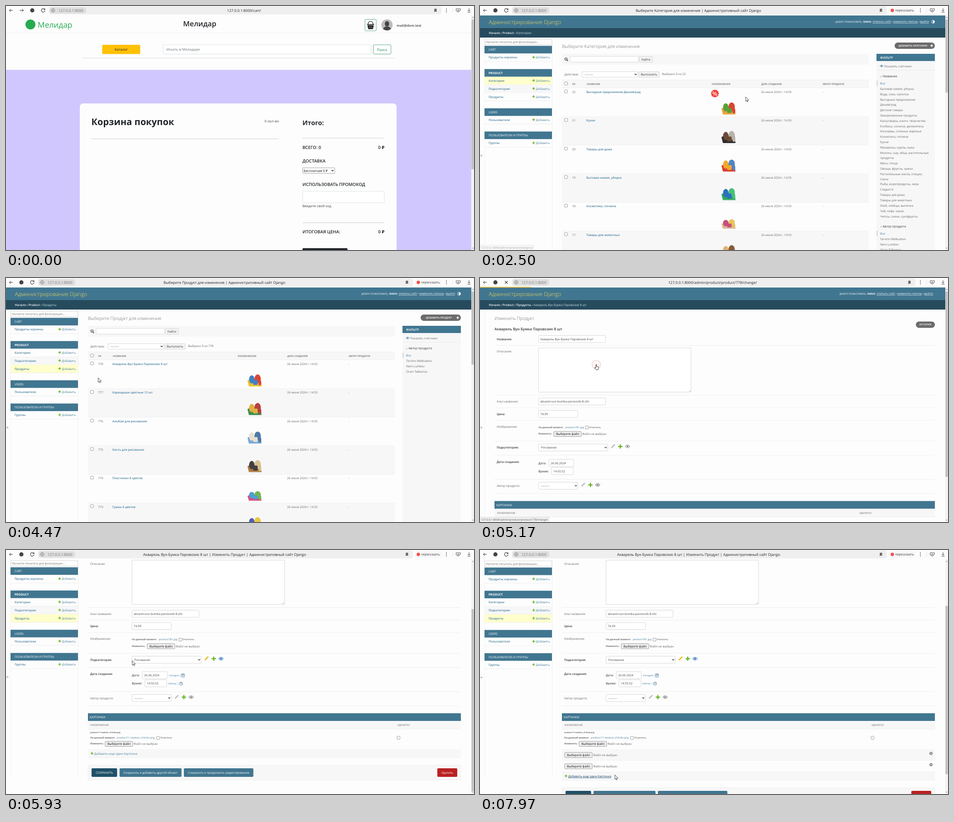
Write an HTML page that moves like this. It is 1034 px wide and 541 px high and loops after 8000 ms.

```html
<!DOCTYPE html>
<html lang="ru">
<head>
<meta charset="utf-8">
<title>Админка</title>
<style>
html, body { margin: 0; width: 100%; height: 100%; overflow: hidden; background: #fdfdfd; }
svg { display: block; width: 100vw; height: 100vh; }
text { font-family: "Open Sans", "Noto Sans", sans-serif; text-rendering: geometricPrecision; white-space: pre; }
.hover { text-decoration: underline; fill: #0b3c5d; }
</style>
</head>
<body>
<svg id="stage" viewBox="0 0 1034 541" xmlns="http://www.w3.org/2000/svg"></svg>
<script>
const LOOP = 8000;
const ITEM = 'Акварель Вун Бумка Паровозик 8 шт';
const TEAL = '#417690', NAVY = '#264b5d', LINK = '#447e9b', PALE = '#f7f7f8', EDGE = '#ebebeb', INK = '#212529';

// Normalise each weight so nominal sizes give the expected line lengths.
const pen = document.createElement('canvas').getContext('2d');
function measure(s, z, w) {
  pen.font = `${w} 100px "Open Sans", "Noto Sans", sans-serif`;
  return pen.measureText(s).width * z / 100;
}
const ratio = {};
for (const [w, s, z, len] of [
  [300, 'Администрирование Django', 12.92, 160],
  [400, 'Канцтовары, книги, творчество', 7, 101],
  [600, 'Бытовая химия, уборка', 7, 78],
  [700, 'Корзина покупок', 21.5, 183]
]) ratio[w] = len / measure(s, z, w);

// ---- drawing helpers ----
function t(x, y, s, { z = 7, w = 400, c = '#666', a = 'start', k = '' } = {}) {
  const size = z * ratio[w];
  return `<text x="${x}" y="${y + z * .33}" font-size="${size.toFixed(3)}" font-weight="${w}" fill="${c}" text-anchor="${a}" class="${k}">${s}</text>`;
}
const r = (x, y, w, h, f, s = 'none', rx = 0) =>
  `<rect x="${x}" y="${y}" width="${w}" height="${h}" rx="${rx}" fill="${f}" stroke="${s}" stroke-width=".7"/>`;
const p = (d, s, w = 1, f = 'none') =>
  `<path d="${d}" stroke="${s}" stroke-width="${w}" fill="${f}" stroke-linecap="round" stroke-linejoin="round"/>`;
const hl = (x, y, x2, c = EDGE) => r(x, y, x2 - x, .8, c);
const dot = (x, y, q, f, s = 'none', w = 1) =>
  `<circle cx="${x}" cy="${y}" r="${q}" fill="${f}" stroke="${s}" stroke-width="${w}"/>`;
const g = (s, x = 0, y = 0, k = '') => `<g class="${k}" transform="translate(${x} ${y})">${s}</g>`;
const plus = (x, y, q = 2.5, c = '#64b324') => p(`M${x - q} ${y}h${2 * q}M${x} ${y - q}v${2 * q}`, c, q * .62);
const pencil = (x, y, q = 2.4, c = '#efb80b') =>
  p(`M${x - q * .6} ${y + q * .6}L${x + q} ${y - q}`, c, q * .75) + p(`M${x - q} ${y + q}l.6-.6`, c, 1);
const eye = (x, y, c, q = 1) =>
  p(`M${x - 5 * q} ${y}q${5 * q} ${-6.5 * q} ${10 * q} 0q${-5 * q} ${6.5 * q} ${-10 * q} 0z`, c, 1.1 * q) + dot(x, y, 2 * q, c);
const box = (x, y) => r(x, y, 6.5, 6.5, '#fff', '#767676', 1);
const input = (x, y, w, h, s = '', tx = 4) => r(x, y, w, h, '#fff', '#c8c8c8', 1.5) + t(x + tx, y + h / 2 + .3, s, { c: '#444' });
const select = (x, y, w, h, s) => input(x, y, w, h, s, 5.5) +
  p(`M${x + w - 6.5} ${y + h / 2 - 1}l2 2l2-2`, '#222', 1.1);
const fileBtn = (x, y) => r(x, y, 61, 11.3, '#efefef', '#767676', 1.5) +
  t(x + 30.5, y + 5.8, 'Выберите файл', { z: 7.2, c: '#111', a: 'middle' }) + t(x + 63, y + 5.8, 'Файл не выбран', { z: 7.1 });
const button = (x, y, w, h, s, f) => r(x, y, w, h, f, 'none', 2) + t(x + w / 2, y + h / 2, s, { c: '#fff', a: 'middle' });
const pill = (x, y, w, s, tx) => r(x, y, w, 14, '#6b6b6b', 'none', 7) + t(tx, y + 7, s, { z: 5.9, w: 600, c: '#fff', a: 'middle' });

// ---- browser bar ----
function bar(title, cx, shift, ask) {
  const end = ask ? 899 : 962, m = end - 13;
  let s = r(0, 0, 1034, 21, '#fcfcfc') + r(95 - shift, 1, end - 95 + shift, 17.5, '#efefef', 'none', 5)
    + r(96 - shift, 3, 81, 13.5, '#dedede', 'none', 5)
    + p('M14.5 9.7H7.5m3-3l-3 3l3 3', '#333')
    + (shift ? '' : p('M30.5 9.7h8m-3-3l3 3l-3 3', '#333'))
    + dot(58 - shift, 9.7, 4.6, '#444');
  const gx = 104 - shift;
  s += dot(gx, 9.7, 4, 'none', '#888', .8) + p(`M${gx - 4} 9.7h8M${gx} 5.7q-3.4 4 0 8q3.4-4 0-8`, '#888', .7)
    + t(116 - shift, 9.9, '127.0.0.1:8000', { z: 8.6, c: '#777' })
    + t(cx, 9.9, title, { z: 8.6, c: '#222', a: 'middle' })
    + p(`M${m - 2} 6.5h4v6.5l-2-1.6l-2 1.6z`, '#666', .8, '#666')
    + [6.2, 9.7, 13.2].map(y => dot(973, y, .9, '#444')).join('')
    + r(986.5, 4, .7, 11, '#ddd')
    + p('M995 6h4v5h-4zM1000 6h4v4h-3v3h-4', '#444', .9)
    + p('M1023 5.5v6m-2.5-2.3l2.5 2.5l2.5-2.5M1020 14h6', '#333', .9);
  if (ask) s += r(904, 3, 58, 13.5, '#f6f6f6', 'none', 5) + dot(911, 9.7, 3.7, '#f0504e') + t(917.5, 9.9, 'пересказать', { z: 7.3, c: '#333' });
  return s;
}

// ---- shop cart ----
function cart() {
  const head = (x, y, s, a) => t(x, y, s, { z: 10.3, w: 600, c: INK, a });
  return r(0, 21, 1028, 520, '#fdfdfd') + hl(0, 59, 1028)
    + dot(54, 41, 11, '#27ab50') + t(70, 42, 'Мелидар', { z: 18.5, c: '#27ab50' })
    + t(428, 39, 'Мелидар', { z: 17, w: 600, c: INK, a: 'middle' })
    + r(793, 29.5, 25, 25.5, '#fff', '#198754', 2)
    + p('M800 41q0-7 5.500-7q5.500 0 5.500 7', '#111', 1.2)
    + p('M798 41h15M799.500 43.500h12l-1.500 7h-9z', '#111', 1.4, '#111')
    + p('M802.500 45v4m3-4v4m3-4v4', '#fff', .7)
    + dot(841.8, 42, 12.4, '#bcbcbc') + `<ellipse cx="841.8" cy="39.500" rx="4.800" ry="6" fill="#444"/>`
    + p('M833.500 51q1-5 8.300-5.500q7.300.5 8.300 5.500q-8.300 6-16.600 0z', '#444', .5, '#444')
    + t(863, 43.5, 'mail@dom.test', { z: 8, w: 600, c: '#444' })
    + r(212.5, 86, 84, 20.5, '#ffc107', 'none', 2) + t(254.5, 96.7, 'Каталог', { z: 8.2, c: INK, a: 'middle' })
    + r(347.5, 86, 459, 20.5, '#fff', '#ced4da', 2) + t(354, 96.7, 'Искать в Мелидаре', { z: 8.4, c: '#6c757d' })
    + r(811.5, 86, 39, 20.5, '#fff', '#198754', 2) + t(831, 96.7, 'Поиск', { z: 8.5, c: '#198754', a: 'middle' })
    + hl(168, 115, 856, '#d2d2d2') + r(0, 141.5, 1028, 400, '#d0c7fe')
    + r(163, 216, 700, 340, '#fdfdfd', 'none', 8)
    + t(188.5, 256.5, 'Корзина покупок', { z: 21.5, w: 700, c: INK })
    + t(603, 255.5, '0 кол-во', { z: 8.2, w: 600, c: '#6c757d', a: 'end' })
    + hl(189, 294, 603, '#c4c4c4') + t(655, 259, 'Итого:', { z: 15, w: 700, c: INK }) + hl(655, 292.5, 836, '#c4c4c4')
    + head(655, 313.5, 'ВСЕГО: 0') + head(836, 313.5, '0 ₽', 'end') + head(655, 343.5, 'ДОСТАВКА')
    + r(655.3, 358.8, 71, 12.3, '#fff', '#767676', 1) + t(657.5, 365.3, 'Бесплатная 0 ₽', { z: 7.8, c: '#111' })
    + p('M719.500 364l1.900 2l1.900-2', '#111', 1.1)
    + head(655, 396, 'ИСПОЛЬЗОВАТЬ ПРОМОКОД') + r(655.3, 411, 180.5, 25.3, '#fff', '#ced4da', 2)
    + t(655, 443.5, 'Введите свой код', { z: 8, c: '#444' }) + hl(655, 480, 836, '#c4c4c4')
    + head(655, 500.5, 'ИТОГОВАЯ ЦЕНА:') + head(836, 500.5, '0 ₽', 'end') + r(655, 537, 99.5, 10, INK, 'none', 2);
}

// ---- admin parts ----
function header(w, end, icon) {
  const u = s => `<tspan text-decoration="underline">${s}</tspan>`;
  return r(0, 21, w, 28, TEAL) + t(19.5, 35.7, 'Администрирование Django', { z: 12.92, w: 300, c: '#f5dd5d' })
    + t(end, 35, `ДОБРО ПОЖАЛОВАТЬ, <tspan font-weight="700">TARVO</tspan>. ${u('ОТКРЫТЬ САЙТ')} / ${u('ИЗМЕНИТЬ ПАРОЛЬ')} / ${u('ВЫЙТИ')}`, { z: 5.9, c: '#fff', a: 'end' })
    + (icon ? dot(end + 9, 35, 3.3, 'none', '#fff', .9) + p(`M${end + 9} 31.700a3.300 3.300 0 0 1 0 6.600z`, '#fff', .3, '#fff') : '');
}
const crumbs = (links, last) => r(0, 49, 1028, 21, NAVY)
  + t(19.5, 59.8, `<tspan font-weight="600">${links.join(' › ')}</tspan> › <tspan fill="#d3e4ec">${last}</tspan>`, { c: '#fff' });

const APPS = [
  ['CART', 85, ['Продукты корзины']],
  ['PRODUCT', 136.5, ['Категории', 'Подкатегории', 'Продукты']],
  ['USERS', 223.5, ['Пользователи']],
  ['ПОЛЬЗОВАТЕЛИ И ГРУППЫ', 275, ['Группы']]
];
function modules(x, w, pad, current) {
  const side = pad > 5, end = x + w;
  return APPS.map(([name, y, rows]) => r(x, y, w, 17, TEAL)
    + t(x + pad, y + 8.7, name, { c: '#fff', w: side && name === 'PRODUCT' ? 700 : 400 })
    + rows.map((row, i) => {
      const top = y + 17 + i * 17.8, mid = top + 8.8, add = side ? end - 35.5 : end - 93;
      return r(x, top, w, 17.8, row === current ? '#ffffcc' : i % 2 ? PALE : '#fdfdfd') + hl(x, top + 17.4, end)
        + t(x + pad, mid, row, { w: 600, c: LINK, k: `${side ? 'side' : 'main'}-${row}` })
        + plus(add - 5, mid - .5) + t(add, mid, 'Добавить', { c: LINK })
        + (side ? '' : pencil(end - 46, mid) + t(end - 41, mid, 'Изменить', { c: LINK }));
    }).join('')).join('');
}
const side = current => r(0, 70, 160, 480, '#fdfdfd') + r(159.2, 70, .8, 480, EDGE) + r(9.6, 70, .6, 480, EDGE)
  + r(10.3, 73.5, 148.5, 12, '#fdfdfd', '#ccc') + t(13, 79.7, 'Начните печатать для фильтрации...', { c: '#757575' })
  + g(modules(10, 149, 9, current), 0, 3.3) + t(1, 331, '«', { z: 10, c: LINK });

function index() {
  return r(0, 21, 1034, 520, '#fdfdfd') + header(1034, 1001, true)
    + t(19.5, 68, 'Администрирование сайта', { z: 10.77, w: 300 }) + modules(19.5, 324.5, 4.5)
    + r(365, 85, 141, 101, PALE) + t(374, 100.5, 'Последние действия', { z: 9, c: '#333' }) + hl(365, 115, 506)
    + t(374, 130, 'Мои действия', { z: 7.4, w: 600 }) + pencil(377.5, 148)
    + t(384, 148.5, ITEM.slice(0, -3), { c: LINK }) + t(384, 157.5, 'шт', { c: LINK }) + t(384, 166.2, 'Продукт', { z: 5.4 });
}

// ---- change lists ----
const GOODS = [
  ['Выгодные предложения Дешевград', ['#e8a33c', '#58a03a', '#d8452e']],
  ['Кухня', ['#2e2b2b', '#6b4a36', '#b9b2aa']],
  ['Товары для дома', ['#d9402f', '#f0a92d', '#4f86c6']],
  ['Бытовая химия, уборка', ['#2fa65a', '#2c6fc0', '#48c078']],
  ['Косметика, гигиена', ['#d8b898', '#c94f7c', '#e8c35a']],
  ['Товары для животных', ['#c98a4b', '#e0b070', '#8a5a34']]
];
const PAINTS = [
  [ITEM, ['#f0c030', '#4080c8', '#d84838']],
  ['Карандаши цветные 12 шт', ['#3f8f4f', '#e0b040', '#b84040']],
  ['Альбом для рисования', ['#7aa8d8', '#e8e0d0', '#5078a8']],
  ['Кисть для рисования', ['#b07840', '#404040', '#d8c090']],
  ['Пластилин 8 цветов', ['#d85080', '#50a0d0', '#70b850']],
  ['Гуашь 6 цветов', ['#e07030', '#5060b0', '#e8c840']]
];
const photo = (y, [a, b, c], h) => p(`M537 ${y}l-3-${h * .45}l8-${h * .15}l20 0l2 ${h * .6}z`, a, 1, a)
  + `<ellipse cx="543" cy="${y - h * .55}" rx="6" ry="${h * .34}" fill="${b}"/>`
  + `<ellipse cx="556" cy="${y - h * .6}" rx="7" ry="${h * .36}" fill="${c}"/>`
  + r(546, y - h * .5, 10, h * .4, b, 'none', 2) + r(558, y - h * .45, 6, h * .38, c, 'none', 2);
function badge() {
  const pts = Array.from({ length: 24 }, (_, i) => {
    const q = i % 2 ? 7.6 : 9, a = i * Math.PI / 12;
    return `${(519 + q * Math.cos(a)).toFixed(1)},${(194 + q * Math.sin(a)).toFixed(1)}`;
  });
  return `<polygon points="${pts.join(' ')}" fill="#f0392f"/>` + t(519, 194.300, '%', { z: 14, w: 600, c: '#fff', a: 'middle' });
}
const KINDS = ['Все', 'Бытовая химия, уборка', 'Вода, соки, напитки', 'Выгодные предложения', '+Дешевград', 'Детские товары',
  'Замороженные продукты', 'Канцтовары, книги, творчество', 'Колбасы, сосиски, деликатесы', 'Консервы, соленья, варенье',
  'Косметика, гигиена', 'Кухня', 'Макароны, крупы, мука', 'Молоко, сыр, яйца, растительные', '+продукты', 'Мясо, птица',
  'Овощи, фрукты, орехи', 'Растительные масла, специи,', '+соусы', 'Рыба, морепродукты, икра', 'Сладости', 'Товары для дома',
  'Товары для животных', 'Хлеб, хлебцы, выпечка', 'Чай, кофе, какао', 'Чипсы, снеки, сухофрукты'];
const PEOPLE = ['Все', 'Tarvino Melkudovs', 'Nero Lumkov', 'Orvin Talkemov'];
function choices(y, name, list) {
  let at = y + 4.6;
  return t(884, y, '↓ ' + name, { z: 7.3, c: '#333' }) + r(876.5, y + 10, 1.8, 12, '#ccc') + list.map((s, i) => {
    at += s[0] === '+' ? 10.9 : 11.9;
    return t(884, at, s.replace('+', ''), { c: i ? '#666' : LINK });
  }).join('');
}
function list(one, add, crumb, rows, first, count, filters) {
  const head = (x, s) => t(x, 172.7, s, { z: 5.8, w: 600 });
  const grey = (x, y, w, s) => r(x, y, w, 12.5, '#f3f3f3', '#c4c4c4', 1.5) + t(x + w / 2, y + 6.5, s, { c: '#333', a: 'middle' });
  return r(0, 21, 1028, 520, '#fdfdfd') + header(1028, 992, true) + crumbs(['Начало', 'Product'], crumb) + side(crumb)
    + t(181, 89, `Выберите ${one} для изменения`, { z: 10.77, w: 300 })
    + pill(916, 81, 89, add, 956.5) + plus(998, 88, 2.6, '#fff')
    + r(181, 106, 678, 24, PALE) + dot(190, 117.5, 2.5, 'none', '#333', 1.2) + p('M192 119.500l2 2.300', '#333', 1.4)
    + r(199, 111.8, 151, 12.5, '#fff', '#ccc', 1.5) + grey(352, 112, 29, 'Найти')
    + t(186.5, 152, 'Действие:') + select(225.5, 145.5, 123, 12.5, '---------') + grey(351, 145.5, 45, 'Выполнить')
    + t(402, 151, `Выбрано 0 из ${count}`)
    + r(181, 164, 678, 17.5, PALE) + hl(181, 163.6, 859) + hl(181, 181.2, 859) + box(187, 168.700)
    + head(204, 'PK') + head(236, 'НАЗВАНИЕ') + head(512, 'ИЗОБРАЖЕНИЕ') + head(621.5, 'ДАТА СОЗДАНИЯ') + head(757, 'АВТОР ПРОДУКТА')
    + rows.map(([name, tones], i) => {
      const y = 190.7 + i * 63.3;
      return (i % 2 ? r(181, y - 8.7, 678, 63.3, PALE) : '') + hl(181, y + 54.2, 859) + box(186.8, y - 4.5)
        + t(203.5, y, first - i) + t(235, y, name, { w: 600, c: LINK, k: name === ITEM ? 'item' : '' })
        + photo(y + 49, tones, i === 4 ? 21 : 27) + t(621, y, '26 июня 2024 г. 14:55') + t(756.5, y, '-');
    }).join('')
    + r(876, 122, 129, 430, PALE) + r(876, 106, 129, 16, TEAL) + t(884, 114.2, 'ФИЛЬТР', { z: 7.3, w: 600, c: '#fff' })
    + eye(887.3, 133, LINK, .7) + t(892.5, 133.7, 'Показать счётчики') + hl(876, 142, 1005) + filters;
}

// ---- change form ----
function form(open, n) {
  const dx = open ? 149 : 0, R = 1005 - dx, live = open ? '#efb80b' : '#bbb', del = open ? 716 : 838;
  const label = (y, s, bold) => t(37, y, s, bold ? { w: 600, c: '#333' } : {});
  const tiny = (x, y, s, o) => t(x, y, s, { z: 5.9, ...o });
  const now = { w: 600, c: '#555' };
  let s = t(32, 89, 'Изменить Продукт', { z: 10.77, w: 300 }) + pill(R - 42, 96.5, 42, 'ИСТОРИЯ', R - 21)
    + t(32, 112.7, ITEM, { z: 8.6, w: 600, c: '#333' })
    + [149.3, 259.5, 287.5, 315.2, 361.3, 392.5, 446, 477.3].map(y => hl(32, y, R)).join('')
    + label(135.5, 'Название:', true) + input(129.3, 127.5, 148, 15.6, ITEM)
    + label(163, 'Описание:') + input(129.3, 155, 337, 98) + p('M462 252l3-3M464 252l1-1', '#888', .6)
    + label(274, 'Альт.название:') + input(129.3, 266, 148, 15.6, 'akvarel-vun-bumka-parovozik-8-sht')
    + label(301.5, 'Цена:', true) + input(129.3, 293.5, 87, 15.6, '74,99')
    + label(329.3, 'Изображение:') + tiny(129, 331, 'На данный момент:', now) + tiny(188.5, 331, 'product/781.jpg', { c: LINK })
    + box(233, 328) + tiny(241, 331, 'Очистить', { c: '#444' }) + tiny(129, 345.2, 'Изменить:', now) + fileBtn(163, 340.2)
    + label(376, 'Подкатегория:', true) + select(129.3, 368, 153, 15.6, 'Рисование')
    + pencil(293.5, 373.5, 3.6, live) + plus(310, 373.5, 3.8) + eye(326, 373.5, open ? '#2b70b8' : '#888')
    + label(407.3, 'Дата создания:', true) + t(129, 410.5, 'Дата:', now) + input(152.3, 402.3, 55, 15.6, '26.06.2024')
    + t(129, 428.5, 'Время:', now) + input(158, 420.2, 48, 15.6, '14:55:52')
    + label(460.7, 'Автор продукта:') + select(129.3, 452.8, 87, 15.6, '---------')
    + pencil(227.5, 458.7, 3.6, '#bbb') + plus(244, 458.7, 3.8) + eye(260, 458.7, '#888')
    + r(32, 494.5, R - 32, 17, TEAL) + t(36, 503.3, 'КАРТИНКИ', { c: '#fff' })
    + r(32, 512, R - 32, 17.5, PALE) + hl(32, 529.3, R)
    + tiny(37.5, 521, 'ИЗОБРАЖЕНИЕ') + tiny(del, 521, 'УДАЛИТЬ?')
    + tiny(37, 536.7, 'product/11-sladosti_xTsFz6z.png', { z: 4.6, w: 600, c: '#444' })
    + tiny(37, 549, 'На данный момент:', now) + tiny(96, 549, 'product/11-sladosti_xTsFz6z.png', { c: LINK })
    + box(183.500, 546) + tiny(192, 549, 'Очистить', { c: '#444' }) + box(del - 1, 545.5)
    + tiny(37, 561.7, 'Изменить:', now) + fileBtn(70, 556.7) + hl(32, 574.3, R);
  if (open) s += tiny(211, 410.5, 'Сегодня |', { c: LINK }) + tiny(209, 428.7, 'Сейчас |', { c: LINK })
    + r(238.5, 407.5, 7, 7, '#fff', TEAL, 1) + p('M238.500 409.500h7M240.500 412h3M240.500 406.500v1.500M243.500 406.500v1.500', TEAL, .9)
    + dot(237.7, 428.7, 3.3, '#fff', TEAL, 1) + p('M237.700 426.700v2h1.500', TEAL, .8);
  for (let i = 0; i < n; i++) {
    const y = 574.5 + i * 25;
    s += r(32, y, R - 32, 25, i % 2 ? '#fdfdfd' : PALE) + hl(32, y + 24.6, R) + fileBtn(38, y + 6.9)
      + dot(R - 8.5, y + 9, 3.6, '#888') + p(`M${R - 9.8} ${y + 7.7}l2.600 2.600m0-2.600l-2.600 2.600`, '#fff', .9);
  }
  s += g(r(32, 574.5, R - 32, 18, PALE) + hl(32, 592.3, R) + plus(41, 583.5) + t(46, 584, 'Добавить еще один Картинка', { c: LINK, k: 'add' })
    + r(32, 609.5, R - 32, 33, PALE, EDGE, 1.5)
    + button(40, 616.5, 56.5, 19, 'СОХРАНИТЬ', '#205067') + button(101.8, 616.5, 137, 19, 'Сохранить и добавить другой объект', TEAL)
    + button(244, 616.5, 153.5, 19, 'Сохранить и продолжить редактирование', TEAL) + button(R - 52, 616.5, 44, 19, 'Удалить', '#ba2121'), 0, n * 25);
  const top = header(1028, open ? 992 : 1001, open) + crumbs(['Начало', 'Product', 'Продукты'], ITEM);
  return r(0, 21, 1028, 520, '#fdfdfd') + g(g(s, dx) + top, 0, 0, 'page')
    + (open ? g(side('Продукты'), 0, 0, 'side') : r(9.6, 70, .6, 480, EDGE) + t(1, 331, '»', { z: 10, c: LINK }));
}

// ---- scenes ----
const SITE = ' | Административный сайт Django';
const OPEN = bar(ITEM + ' | Изменить Продукт' + SITE, 483, 24, true);
const scenes = [
  [0, bar('127.0.0.1:8000/cart/', 526, 0), cart(), 30, 332],
  [1020, bar('Администрирование сайта' + SITE, 526.5, 0), index(), 0, 0],
  [2080, bar('Выберите Категория для изменения' + SITE, 482.5, 24, true),
    list('Категория', 'ДОБАВИТЬ КАТЕГОРИЯ', 'Категории', GOODS, 22, 22,
      choices(155.5, 'Название', KINDS) + choices(488.3, 'Автор продукта', PEOPLE)) + badge(), 30, 162],
  [3950, bar('Выберите Продукт для изменения' + SITE, 482.5, 24, true),
    list('Продукт', 'ДОБАВИТЬ ПРОДУКТ', 'Продукты', PAINTS, 778, 778, choices(155.5, 'Автор продукта', PEOPLE)), 30, 162],
  [5150, bar('127.0.0.1:8000/admin/product/product/778/change/', 514, 24), form(false, 0), 30, 411],
  [5330, OPEN, form(true, 0), 131, 404],
  [6800, OPEN, form(true, 1), 127, 388],
  [7420, OPEN, form(true, 2), 124, 373]
];
const stage = document.getElementById('stage');
stage.innerHTML = '<clipPath id="view"><rect y="21" width="1034" height="520"/></clipPath>'
  + scenes.map(s => `<g class="scene">${s[1]}<g clip-path="url(#view)">${s[2]}</g></g>`).join('')
  + `<g id="scroll">${r(1028, 21, 6, 520, '#f3f3f3')}${p('M1029.500 26.500l1.500-2l1.500 2M1029.500 536l1.500 2l1.500-2', '#777', .8)}<rect id="thumb" x="1028.400" width="5.200" fill="#c1c1c1"/></g>`
  + `<g id="reload">${p('M3.500-2.200A4 4 0 1 0 4 1M4-4v2.600h-2.600', '#333', 1.1)}</g><g id="stop">${p('M-2.700-2.700l5.400 5.400m0-5.400l-5.400 5.400', '#333', 1.1)}</g>`
  + '<rect id="load" y="19.600" height="1.700" fill="#f3c23c"/>'
  + `<g id="status"><rect x="-2" y="530.500" height="12" fill="#f1f1f1" stroke="#d0d0d0" stroke-width=".7"/>${t(2, 536, '', { z: 6.5, c: '#555' })}</g>`
  + '<circle id="ring" fill="#f8d0d0" fill-opacity=".25" stroke="#e87878" stroke-width="1.300"/>'
  + `<g id="arrow">${p('M0 0v9.300l2.200-2l1.500 3.300l1.400-.6l-1.500-3.200h3z', '#222', .8, '#fff')}</g>`
  + `<g id="hand">${p('M-1 0q1-1 1.800 0v4l4 1v3l-1 3.500h-4.500l-3.300-4.500q.5-1.500 3 0z', '#222', .9, '#fff')}</g>`;

const $ = id => document.getElementById(id);
const groups = [...stage.querySelectorAll('.scene')];
const pages = stage.querySelectorAll('.page'), sides = stage.querySelectorAll('g.side');
const show = (el, on) => { el.style.display = on ? '' : 'none'; };
const set = (el, o) => { for (const k in o) el.setAttribute(k, o[k]); };
const clamp = v => Math.max(0, Math.min(1, v));
const ease = v => v * v * (3 - 2 * v);

// ---- timing ----
const LOADS = [[720, 1020, 1120], [1800, 2080, 2180], [3730, 3950, 4050], [4990, 5150, 5330]];
const PATH = [[30, 928, 122], [500, 379, 176], [700, 379, 176], [1050, 413, 181], [1300, 413, 181], [1740, 42, 163],
  [1850, 42, 163], [2500, 587, 202], [3200, 580, 212], [3640, 40, 203], [3730, 40, 203], [3830, 63, 209], [4250, 180, 235],
  [4850, 257, 192], [5250, 257, 192], [5650, 285, 225], [5930, 279, 246], [6370, 279, 246], [6640, 268, 451],
  [6830, 268, 451], [7120, 268, 477], [7450, 268, 477], [7700, 272, 500], [7970, 298, 499]];
const CLICKS = [[1800, 42, 163], [3730, 40, 203], [4990, 257, 192], [6780, 268, 451], [7400, 268, 477]];
const HANDS = [[1700, 1880], [3610, 3760], [4800, 5260], [6600, 7820]];
const HOVERS = [[1700, 2080, 'main-Категории'], [3610, 3950, 'side-Продукты'], [4800, 5150, 'item'], [6600, 8000, 'add']];
const BASE = '127.0.0.1:8000/admin/product/';
const STATUS = [[1740, 2430, 'category/'], [3640, 3930, 'product/'], [4860, 5280, 'product/778/change/'], [6680, 7780, 'product/778/change/#']];
const hovered = HOVERS.map(h => stage.querySelectorAll('[class="' + h[2] + '"]'));

function draw(now) {
  const at = now % LOOP, inside = ([a, b]) => at >= a && at < b;
  const n = scenes.findLastIndex(s => at >= s[0]);
  groups.forEach((el, i) => show(el, i === n));

  const roll = ease(clamp((at - 5700) / 180));
  pages.forEach((el, i) => set(el, { transform: `translate(0 ${i ? -132.5 * roll : 0})` }));
  sides.forEach((el, i) => set(el, { transform: `translate(0 ${-Math.min(i ? 49.5 : 50, 132.5 * roll)})` }));
  const [, , , top, len] = scenes[n];
  show($('scroll'), len);
  set($('thumb'), { y: n > 4 ? 30 + (top - 30) * roll : top, height: len });

  const busy = LOADS.some(([a, , b]) => at >= a && at < b), ix = n < 2 ? 82 : 58;
  show($('reload'), !busy);
  show($('stop'), busy);
  for (const id of ['reload', 'stop']) set($(id), { transform: `translate(${ix} 9.7)` });
  const run = LOADS.find(([a, , b]) => at >= a && at < b + 200);
  show($('load'), run);
  if (run) {
    const [a, , b] = run;
    set($('load'), { width: 113 * clamp((at - a) / 111) + 921 * clamp((at - b + 40) / 40), opacity: 1 - clamp((at - b) / 200) });
  }

  hovered.forEach((els, i) => els.forEach(el => el.classList.toggle('hover', inside(HOVERS[i]))));
  const tip = STATUS.find(([a, b]) => at >= a && at < b + 140);
  show($('status'), tip);
  if (tip) {
    const [rect, text] = $('status').children, s = BASE + tip[2];
    text.textContent = s;
    set(rect, { width: measure(s, 6.5 * ratio[400], 400) + 6 });
    set($('status'), { opacity: 1 - clamp((at - tip[1]) / 140) });
  }

  const hit = CLICKS.find(([a]) => at >= a && at < a + 300);
  show($('ring'), hit);
  if (hit) {
    const v = (at - hit[0]) / 300;
    set($('ring'), { cx: hit[1], cy: hit[2], r: 4 + 9 * v, opacity: 1 - v });
  }

  const k = Math.max(0, PATH.findLastIndex(q => at >= q[0]));
  const from = PATH[k], to = PATH[k + 1] || from;
  const v = ease(clamp((at - from[0]) / (to[0] - from[0] || 1)));
  const hand = HANDS.some(inside);
  show($('hand'), hand);
  show($('arrow'), !hand && at >= 30);
  const place = `translate(${from[1] + (to[1] - from[1]) * v} ${from[2] + (to[2] - from[2]) * v})`;
  for (const id of ['arrow', 'hand']) set($(id), { transform: place });
}

const start = performance.now();
function tick() {
  draw(performance.now() - start);
  requestAnimationFrame(tick);
}
tick();
</script>
</body>
</html>
```
